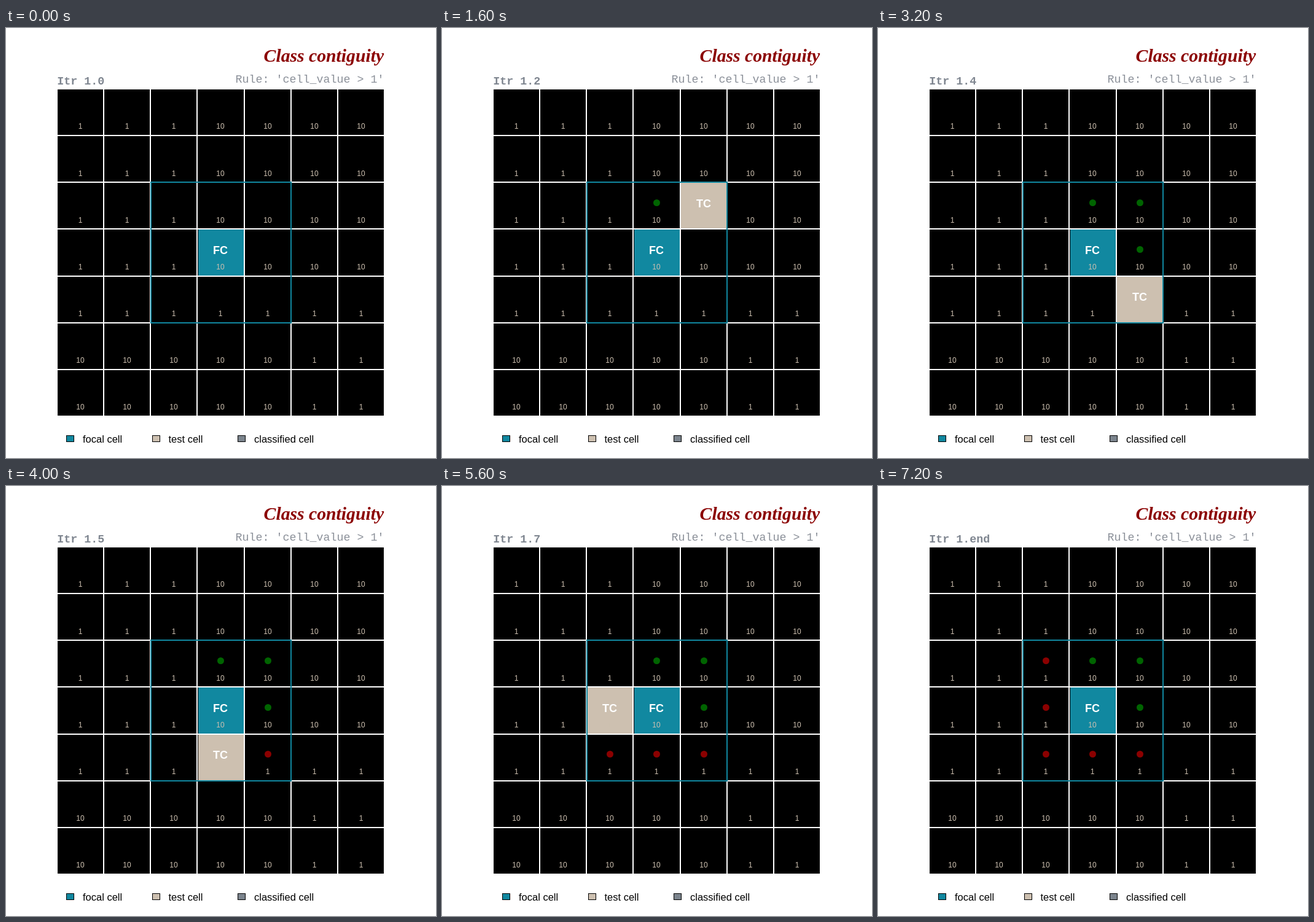
Recreate the animation shown at these times as an HTML page. Size 700x700 px, loop 8000 ms.

```html
<!DOCTYPE html>
<html lang="en">
<head>
<meta charset="utf-8">
<title>Class contiguity</title>
<style>
  html, body { margin: 0; width: 100%; height: 100%; overflow: hidden; background: #fff; }
  svg { display: block; width: 100vw; height: 100vh; }
  text { font-family: "Liberation Sans", Arial, sans-serif; white-space: pre; }
  .title { font: italic bold 29.7px "Liberation Serif", "Times New Roman", serif; fill: #8b0000; }
  .mono { font: 18.33px "Liberation Mono", "Courier New", monospace; fill: #8b9099; }
  .itr { font-weight: bold; fill: #7f8690; }
  .num { font-size: 12px; text-anchor: middle; fill: #cdc0b0; }
  .tag { font-size: 18px; font-weight: bold; text-anchor: middle; fill: #fff; }
  .key { font-size: 16.5px; fill: #000; }
</style>
</head>
<body>
<svg id="stage" viewBox="0 0 700 700"></svg>
<script>
const NS = "http://www.w3.org/2000/svg";
const stage = document.getElementById("stage");
const TEAL = "#1188a0", TAN = "#cdc0b0", GRAY = "#7b848d";
const N = 7, PITCH = 76.2, STEP = 800;

// Neighbours of the focal cell, clockwise from the top: column, row
const ring = [[3, 2], [4, 2], [4, 3], [4, 4], [3, 4], [2, 4], [2, 3], [2, 2]];

function add(tag, attrs, text) {
  const el = document.createElementNS(NS, tag);
  for (const k in attrs) el.setAttribute(k, attrs[k]);
  if (text !== undefined) el.textContent = text;
  stage.appendChild(el);
  return el;
}
const rect = (x, y, width, height, fill) => add("rect", { x, y, width, height, fill });
const label = (cls, x, y, text) => add("text", { class: cls, x, y }, text);
const show = (el, on) => el.setAttribute("visibility", on ? "visible" : "hidden");

// Left and top edges of the cells, and of the white separators beside them
const edgeX = i => Math.round(82.4 + PITCH * i);
const edgeY = i => Math.round(97.8 + PITCH * i);
const lineX = i => Math.floor(82.2 + PITCH * i);
const midX = c => Math.round(120.8 + PITCH * c);
const baseY = r => Math.round(164.4 + 76.15 * r);

const value = (c, r) => r < 4 ? (c < 3 ? 1 : 10) : r === 4 ? 1 : c < 5 ? 10 : 1;

function cellBox(c, r, fill) {
  const x = edgeX(c) + 2, y = edgeY(r) + 2;
  return rect(x, y, edgeX(c + 1) - x, edgeY(r + 1) - y, fill);
}

rect(0, 0, 700, 700, "#fff");
label("title", 419.6, 55, "Class contiguity");
label("mono", 373.5, 89, "Rule: 'cell_value > 1'");
const itr = label("mono itr", 83.3, 92, "");

rect(84, 100, 531, 531, "#000");
for (let i = 1; i < N; i++) {
  rect(lineX(i), 100, 2, 531, "#fff");
  rect(84, edgeY(i), 531, 2, "#fff");
}
cellBox(3, 3, TEAL);
const testBoxes = ring.map(([c, r]) => cellBox(c, r, TAN));
// Separator beside the focal column stays above the test cell
rect(lineX(3), 100, 2, 531, "#fff");
add("rect", {
  x: edgeX(2) + 1, y: edgeY(2) + 1,
  width: edgeX(5) - edgeX(2), height: edgeY(5) - edgeY(2),
  fill: "none", stroke: TEAL, "stroke-width": 2
});

for (let r = 0; r < N; r++)
  for (let c = 0; c < N; c++) label("num", midX(c), baseY(r), value(c, r));

label("tag", midX(3), baseY(3) - 25, "FC");
const tags = ring.map(([c, r]) => label("tag", midX(c), baseY(r) - 25, "TC"));
const dots = ring.map(([c, r]) => add("circle", {
  cx: midX(c) + 0.5, cy: baseY(r) - 32.5, r: 5.5,
  fill: value(c, r) > 1 ? "#006400" : "#8b0000"
}));

[["focal cell", 98, 125, TEAL], ["test cell", 238, 264.5, TAN], ["classified cell", 377, 404, GRAY]]
  .forEach(([text, x, tx, fill]) => {
    add("rect", { x: x + 0.5, y: 663.5, width: 12, height: 10, fill, stroke: "#000" });
    label("key", tx, 675, text);
  });

let last = -1;
function draw(time) {
  const step = Math.floor(time / STEP) % 10;
  if (step === last) return;
  last = step;
  itr.textContent = "Itr 1." + (step < 9 ? step : "end");
  ring.forEach((_, i) => {
    const testing = step === i + 1;
    show(testBoxes[i], testing);
    show(tags[i], testing);
    show(dots[i], step > i + 1);
  });
}

let start;
function tick(now) {
  if (start === undefined) start = now;
  draw(Math.max(0, now - start));
  requestAnimationFrame(tick);
}
draw(0);
requestAnimationFrame(tick);
</script>
</body>
</html>
```
